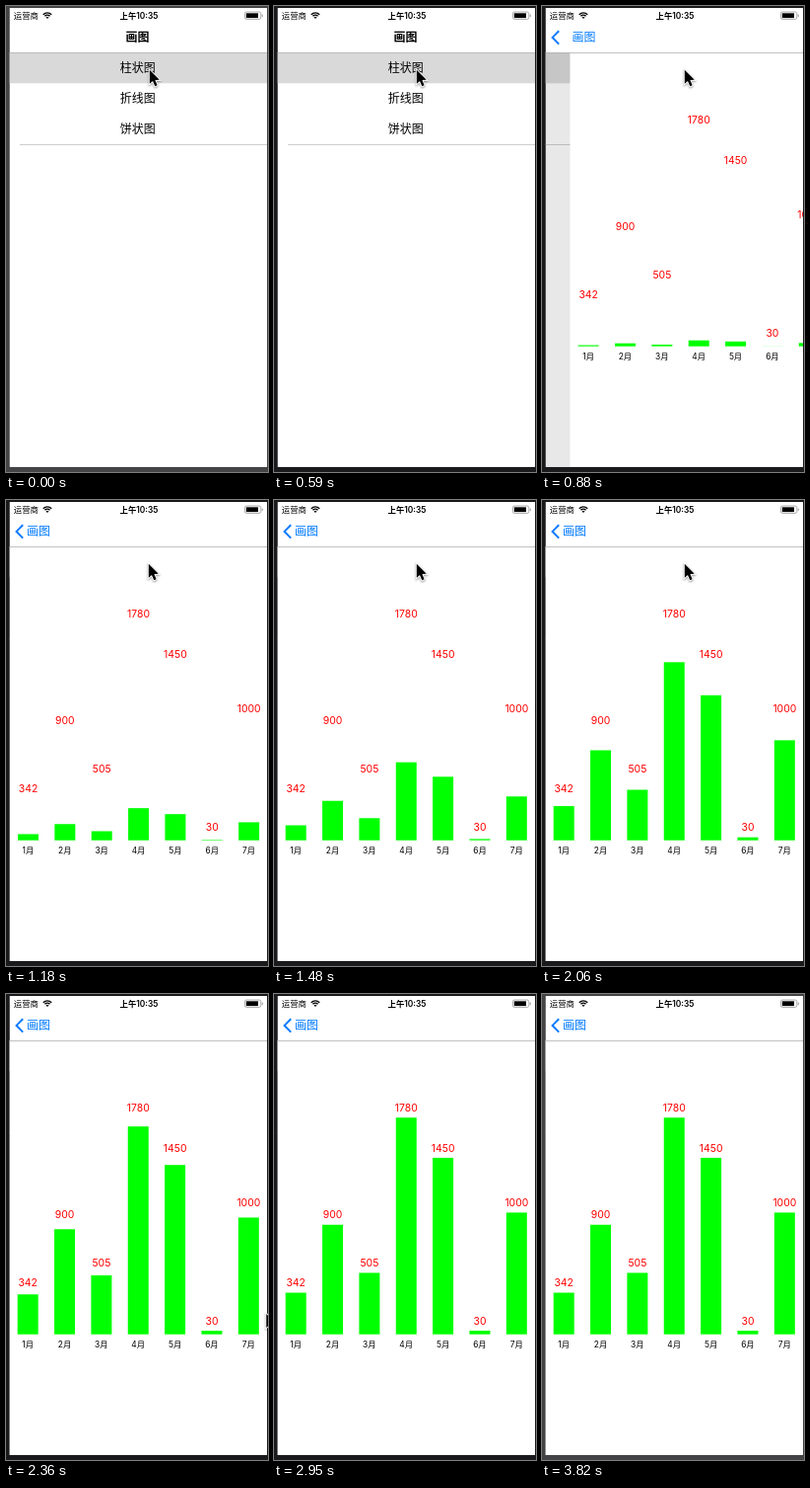
Animation, 266 px wide and 472 px high, one loop 3920 ms. Source, as an HTML page with a canvas:

```html
<!DOCTYPE html>
<html lang="zh-CN">
<head>
<meta charset="utf-8">
<style>
  html, body { margin: 0; width: 100%; height: 100%; overflow: hidden; background: #1a1a1c; }
  canvas { display: block; }
</style>
</head>
<body>
<canvas id="stage" width="266" height="472"></canvas>
<script>
const ctx = document.getElementById('stage').getContext('2d');
const LOOP = 3920, START = 645, GROW = 2000;
const LEFT = 3.5, TOP = 2, RIGHT = 265, BOTTOM = 467, NAV = 47;
const WIDTH = RIGHT - LEFT, BASE = 344.7;
const VALUES = [342, 900, 505, 1780, 1450, 30, 1000];
const BLUE = '#007aff';
// The picture is held between these times.
const TICKS = [0, 450, 590, 740, 880, 1030, 1180, 1330, 1480, 1630, 1770,
  1920, 2060, 2210, 2360, 2510, 2650, 3820];

function rect(x, y, w, h, color) {
  ctx.fillStyle = color;
  ctx.fillRect(x, y, w, h);
}

function text(str, x, y, size, color = '#000', align = 'center', weight = 400) {
  ctx.font = `${weight} ${size}px Inter, "Noto Sans CJK SC", "Noto Sans CJK", sans-serif`;
  ctx.textAlign = align;
  ctx.fillStyle = color;
  ctx.fillText(str, x, y);
}

function faded(alpha, draw) {
  ctx.save();
  ctx.globalAlpha = Math.max(0, Math.min(1, alpha));
  draw();
  ctx.restore();
}

// cubic-bezier(.42, 0, .58, 1)
function easeInOut(x) {
  if (x <= 0) return 0;
  if (x >= 1) return 1;
  let lo = 0, hi = 1, s;
  for (let i = 0; i < 24; i++) {
    s = (lo + hi) / 2;
    const bx = 3 * (1 - s) * s * ((1 - s) * 0.42 + s * 0.58) + s ** 3;
    if (bx < x) lo = s; else hi = s;
  }
  return s * s * (3 - 2 * s);
}

// Critically damped spring: share of the push still to go
function pushLeft(t) {
  const k = Math.max(0, t - START) * 0.0168;
  return (1 + k) * Math.exp(-k);
}

function statusBar() {
  text('运营商', 7.8, 12.8, 8.4, '#000', 'left');
  text('上午10:35', 135, 12.8, 8.4, '#000', 'center', 600);

  ctx.strokeStyle = '#000';
  ctx.lineWidth = 1.4;
  for (const r of [3.6, 6]) {
    ctx.beginPath();
    ctx.arc(42, 12.9, r, -Math.PI * 0.75, -Math.PI * 0.25);
    ctx.stroke();
  }
  ctx.fillStyle = '#000';
  ctx.beginPath();
  ctx.moveTo(42, 13);
  ctx.arc(42, 12.9, 2, -Math.PI * 0.75, -Math.PI * 0.25);
  ctx.fill();

  ctx.strokeStyle = '#999';
  ctx.lineWidth = 0.8;
  ctx.beginPath();
  ctx.roundRect(242.4, 6, 16.4, 7.4, 1.8);
  ctx.stroke();
  rect(243.8, 7.3, 12.2, 4.8, '#000');
  rect(259.7, 8.5, 1, 2.6, '#999');
}

function navBar(left) {
  const done = 1 - left;
  faded(1 - done * 1.7, () =>
    text('画图', 133.5 - 100 * done, 36.3, 12, '#000', 'center', 700));
  faded(done * 1.2, () => {
    text('画图', 21 + 100 * left, 36.3, 12, BLUE, 'left');
    ctx.strokeStyle = BLUE;
    ctx.lineWidth = 2;
    ctx.beginPath();
    ctx.moveTo(17.2, 25.2);
    ctx.lineTo(10.6, 31.9);
    ctx.lineTo(17.2, 38.6);
    ctx.stroke();
  });
  rect(LEFT, NAV, WIDTH, 0.8, '#b2b2b2');
}

function listPage(left) {
  const dx = -0.3 * WIDTH * (1 - left);
  rect(LEFT, NAV, WIDTH, 31.3, '#d9d9d9');
  ['柱状图', '折线图', '饼状图'].forEach((name, i) =>
    text(name, 133.8 + dx, 66.6 + 31.3 * i, 12));
  rect(Math.max(LEFT, 14 + dx), 140, RIGHT, 0.9, '#c8c7cc');
  rect(LEFT, NAV, WIDTH, BOTTOM - NAV, `rgba(0,0,0,${0.1 * (1 - left)})`);
}

function chartPage(left, grow) {
  ctx.save();
  ctx.translate(left * WIDTH, 0);
  rect(LEFT, NAV, WIDTH, BOTTOM - NAV, '#fff');
  VALUES.forEach((value, i) => {
    const x = LEFT + WIDTH / 7 * (i + 0.5);
    const full = value * 0.1233;
    rect(x - 10.5, BASE - full * grow, 21, full * grow, '#0f0');
    text(value, x, BASE - full - 6.3, 10.4, '#f00');
    text(i + 1 + '月', x, 358.2, 8.4);
  });
  ctx.restore();
}

function cursor(x, y) {
  ctx.save();
  ctx.translate(x, y);
  ctx.beginPath();
  for (const [px, py] of [[0, 0], [0, 14], [3.2, 11.2], [5.5, 16.4], [7.8, 15.4], [5.6, 10.3], [10, 10]])
    ctx.lineTo(px, py);
  ctx.closePath();
  ctx.shadowColor = 'rgba(0,0,0,.4)';
  ctx.shadowBlur = 2;
  ctx.shadowOffsetY = 1;
  ctx.strokeStyle = '#fff';
  ctx.lineWidth = 2;
  ctx.stroke();
  ctx.shadowColor = 'transparent';
  ctx.fillStyle = '#000';
  ctx.fill();
  ctx.restore();
}

function drawCursor(t) {
  if (t < 450) cursor(145.8, 64.8);
  else if (t < 2210) cursor(144.8, 64.8);
  else if (t < 2360) cursor(258, 300);
  else if (t < 2650) cursor(264.3, 324);
}

function draw(now) {
  const time = now % LOOP;
  const t = TICKS.findLast(tick => tick <= time);
  const left = pushLeft(t);

  rect(0, 0, 266, 472, t < 590 || t >= 3820 ? '#444446' : '#1a1a1c');
  ctx.save();
  ctx.beginPath();
  ctx.rect(LEFT, TOP, WIDTH, BOTTOM - TOP);
  ctx.clip();
  rect(LEFT, TOP, WIDTH, BOTTOM - TOP, '#fff');
  listPage(left);
  if (t > START) chartPage(left, easeInOut((t - START) / GROW));
  navBar(left);
  statusBar();
  ctx.restore();
  drawCursor(t);
}

const begin = performance.now();
function loop() {
  draw(performance.now() - begin);
  requestAnimationFrame(loop);
}
loop();
</script>
</body>
</html>
```
